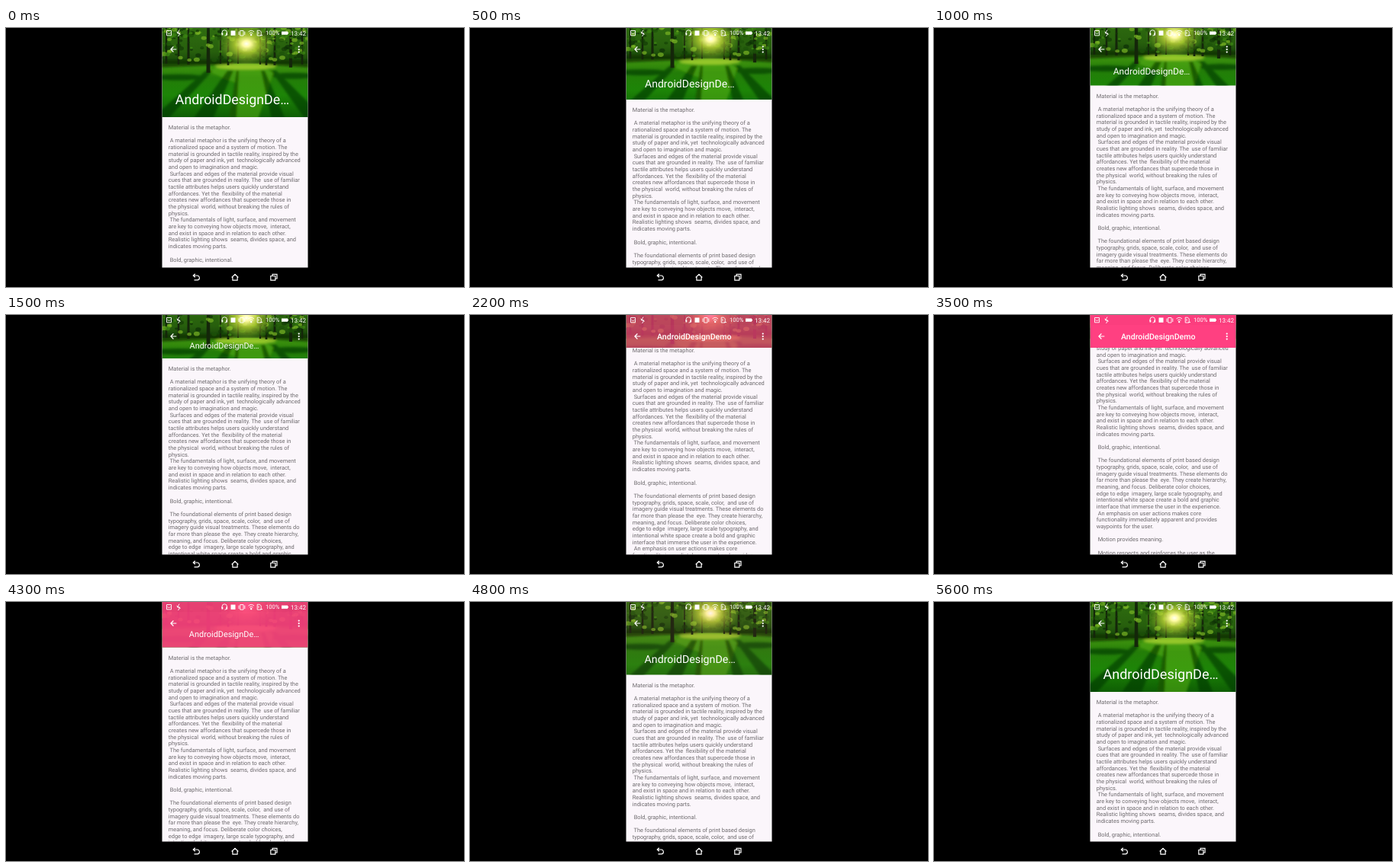
Recreate the animation shown at these times as an HTML page. Size 600 by 340 pixels, loop 5700 ms.

```html
<!DOCTYPE html>
<html lang="en">
<head>
<meta charset="utf-8">
<title>Collapsing toolbar</title>
<style>
  html, body { margin: 0; width: 100%; height: 100%; overflow: hidden; background: #000; }
  svg { display: block; width: 600px; height: 340px; }
  text { font-family: Roboto, "Noto Sans", sans-serif; text-rendering: geometricPrecision; white-space: pre; }
  #body { font-size: 7.41px; fill: #6d6a6d; }
  #title, .solid { fill: #fff; }
  .line { fill: none; stroke: #fff; }
</style>
</head>
<body>
<svg viewBox="0 0 600 340">
  <defs>
    <clipPath id="screen"><rect x="204.5" width="191" height="314.5"/></clipPath>
    <clipPath id="headClip"><rect id="headRect" x="204.5" width="191" height="117"/></clipPath>
    <linearGradient id="canopy" x2="0" y2="1">
      <stop stop-color="#2f6d10"/><stop offset=".6" stop-color="#275f0d"/><stop offset="1" stop-color="#123c08"/>
    </linearGradient>
    <linearGradient id="grass" x2="0" y2="1">
      <stop stop-color="#43960f"/><stop offset=".25" stop-color="#237d08"/>
      <stop offset=".55" stop-color="#1d8507"/><stop offset="1" stop-color="#0c5803"/>
    </linearGradient>
    <radialGradient id="glow">
      <stop stop-color="#fffff0"/><stop offset=".14" stop-color="#fdfba0"/>
      <stop offset=".4" stop-color="#d2e33c" stop-opacity=".7"/><stop offset="1" stop-color="#8fc02a" stop-opacity="0"/>
    </radialGradient>
    <filter id="soft" x="-10%" y="-10%" width="120%" height="120%"><feGaussianBlur stdDeviation="1.6"/></filter>
    <filter id="crisp"><feGaussianBlur stdDeviation=".5"/></filter>
  </defs>

  <g clip-path="url(#screen)">
    <rect x="204" width="192" height="316" fill="#fbf6fb"/>
    <g id="body" xml:space="preserve"></g>

    <g clip-path="url(#headClip)">
      <g id="photo">
        <rect x="204" width="192" height="52" fill="url(#canopy)"/>
        <rect x="204" y="47" width="192" height="75" fill="url(#grass)"/>
        <g filter="url(#soft)">
          <path d="M204 42H298V48L204 52ZM332 42H396V52L332 48Z" fill="#0f3507" opacity=".8"/>
          <path d="M288 50H336L350 60L330 120H292L300 72L262 56Z" fill="#58b012" opacity=".55"/>
          <ellipse cx="314" cy="51" rx="40" ry="4" fill="#b4d836" opacity=".7"/>
          <g id="shadows" fill="#083c02" opacity=".65"></g>
        </g>
        <g filter="url(#crisp)">
          <g id="trunks" fill="#14260a"></g>
          <g id="leaves"></g>
        </g>
        <ellipse cx="315" cy="21" rx="38" ry="30" fill="url(#glow)"/>
      </g>
      <g id="scrim" fill="#ff4081">
        <rect x="204" width="192" height="120"/>
        <rect x="204" width="192" height="13" fill="#fb3e7e"/>
      </g>
    </g>

    <text id="title"></text>
    <path class="line" stroke-width="1.2" d="M223.3 28H216M219.4 24.5L215.9 28L219.4 31.5"/>
    <g class="solid">
      <circle cx="383.7" cy="24.6" r="1.15"/><circle cx="383.7" cy="28.1" r="1.15"/><circle cx="383.7" cy="31.6" r="1.15"/>
    </g>

    <g class="line" stroke-width=".9">
      <path d="M210.5 3.5H216.5V9.8H210.5ZM211.5 6L213.5 8L215.5 6"/>
      <path d="M227 2.5L224.5 7H228L225.5 11M223.5 5L228.5 8.5"/>
      <path d="M283 8V6A3.2 3.2 0 0 1 289.5 6V8Q289.5 10 286.5 10"/>
      <path d="M306.8 3.5H311V10H306.8ZM305 4.5V9M312.8 4.5V9"/>
      <path d="M317.5 5Q321.2 1.8 325 5M319 7Q321.2 5 323.5 7"/>
      <path d="M329.2 3.2H332.5L334.2 5V10H329.2ZM331 5V8M333 9.5H336"/>
    </g>
    <g class="solid">
      <rect x="282.5" y="6.5" width="1.8" height="3"/><rect x="288.3" y="6.5" width="1.8" height="3"/>
      <rect x="294.5" y="3.5" width="6" height="6.3"/>
      <circle cx="321.2" cy="9" r="1.2"/>
      <rect x="361" y="4.5" width="8" height="4.3"/><rect x="369" y="5.6" width="1" height="2"/>
      <text x="340" y="9.4" font-size="7.6">100%</text>
      <text x="373" y="9.5" font-size="8">13:42</text>
    </g>
  </g>

  <g class="line" stroke-width="1.2">
    <path d="M247.8 322.8L245.3 325L247.8 327.2M245.5 325H250.5A2.9 2.9 0 0 1 250.5 330.8H246.5"/>
    <path d="M295.7 327.5L300 323.3L304.3 327.5M296.9 327V331.2H303.1V327"/>
    <path d="M346.8 325.5H352.8V331.2H346.8ZM349 325.3V323.4H355V329H353"/>
  </g>
</svg>

<script>
const $ = id => document.getElementById(id);

const LINES = `Material is the metaphor.

 A material metaphor is the unifying theory of a
rationalized space and a system of motion. The
material is grounded in tactile reality, inspired by the
study of paper and ink, yet  technologically advanced
and open to imagination and magic.
 Surfaces and edges of the material provide visual
cues that are grounded in reality. The  use of familiar
tactile attributes helps users quickly understand
affordances. Yet the  flexibility of the material
creates new affordances that supercede those in
the physical  world, without breaking the rules of
physics.
 The fundamentals of light, surface, and movement
are key to conveying how objects move,  interact,
and exist in space and in relation to each other.
Realistic lighting shows  seams, divides space, and
indicates moving parts.

 Bold, graphic, intentional.

 The foundational elements of print based design
typography, grids, space, scale, color,  and use of
imagery guide visual treatments. These elements do
far more than please the  eye. They create hierarchy,
meaning, and focus. Deliberate color choices,
edge to edge  imagery, large scale typography, and
intentional white space create a bold and graphic
interface that immerse the user in the experience.
 An emphasis on user actions makes core
functionality immediately apparent and provides
waypoints for the user.

 Motion provides meaning.

 Motion respects and reinforces the user as the`.split("\n");

const PITCH = 8.67;
$("body").innerHTML = LINES.map((s, i) =>
  `<text xml:space="preserve" x="212.8" y="${(2.1 + i * PITCH).toFixed(2)}">${s}</text>`).join("");

// Woodland: seeded foliage, trunks, and shadows fanning out from the sun
let seed = 7;
const rand = () => (seed = seed * 16807 % 2147483647) / 2147483647;
const LEAF = ["#123a06", "#0d2f05", "#3f8a12", "#79b424", "#1c5209"];
$("leaves").innerHTML = Array.from({ length: 230 }, () => {
  const x = 204 + rand() * 192, y = rand() ** 1.3 * 44, r = .8 + rand() * 2.2;
  const fill = LEAF[Math.floor(rand() * LEAF.length)];
  return `<ellipse cx="${x}" cy="${y}" rx="${r * 1.4}" ry="${r}" fill="${fill}" opacity=".7"/>`;
}).join("");

const trunks = [[210, 2, 47], [226, 2, 48], [239, 2.4, 48], [265, 3.6, 59], [281, 1.6, 47], [291, 2, 49],
  [304, 1.4, 47], [333, 1.6, 48], [341, 2, 49], [352, 2.2, 49], [373, 3, 52], [388, 2, 48]];
$("trunks").innerHTML = trunks.map(([x, w, b]) =>
  `<path d="M${x - w / 2} 0H${x + w / 2}L${x + w * .7} ${b}H${x - w * .7}Z"/>`).join("");

const shadows = [[290, 8, 245, 26], [302, 3, 292, 10], [334, 5, 348, 18], [347, 7, 392, 26], [262, 9, 190, 22]];
$("shadows").innerHTML = shadows.map(([x, w, x2, w2]) =>
  `<path d="M${x} 56H${x + w}L${x2 + w2} 120H${x2}Z"/>`).join("")
  + '<ellipse cx="226" cy="65" rx="34" ry="4"/><ellipse cx="376" cy="63" rx="28" ry="4"/>';

const LOOP = 5700, FRAME = 100, MAX = 118, MIN = 43;
// [time, centre of the first text line]
const SCROLL = [[0, 131], [500, 108], [1500, 71], [2200, 47], [3300, -.6], [3400, -.6], [3500, .4],
  [4000, 46], [4300, 73.5], [4700, 104], [5200, 132], [LOOP, 132]];
const SCRIM = [[0, 0], [1780, 0], [2380, 1], [4240, 1], [4840, 0], [LOOP, 0]];

const lerp = (a, b, p) => a + (b - a) * p;
function at(keys, t) {
  const i = keys.findIndex(k => k[0] > t);
  const [t0, a] = keys[i - 1], [t1, b] = keys[i];
  return lerp(a, b, (t - t0) / (t1 - t0));
}

function draw(t) {
  const y = at(SCROLL, t);
  const head = Math.min(MAX, Math.max(MIN, y - 14));
  const p = (MAX - head) / (MAX - MIN);
  const size = lerp(18, 10.6, 1 - (1 - p) ** 2);
  const title = $("title");

  $("body").setAttribute("transform", `translate(0 ${y})`);
  $("headRect").setAttribute("height", head);
  $("photo").setAttribute("transform", `translate(0 ${(head - MAX) * .28})`);
  $("scrim").setAttribute("opacity", at(SCRIM, t));
  title.textContent = p === 1 ? "AndroidDesignDemo" : "AndroidDesignDe…";
  title.setAttribute("font-weight", p === 1 ? 500 : 400);
  title.setAttribute("font-size", size);
  title.setAttribute("x", lerp(221.5, 245, p));
  title.setAttribute("y", lerp(94.4, 28, p) + size * .355);
}

const start = performance.now();
function tick() {
  const t = (performance.now() - start) % LOOP;
  draw(Math.floor(t / FRAME) * FRAME);
  requestAnimationFrame(tick);
}
tick();
</script>
</body>
</html>
```
